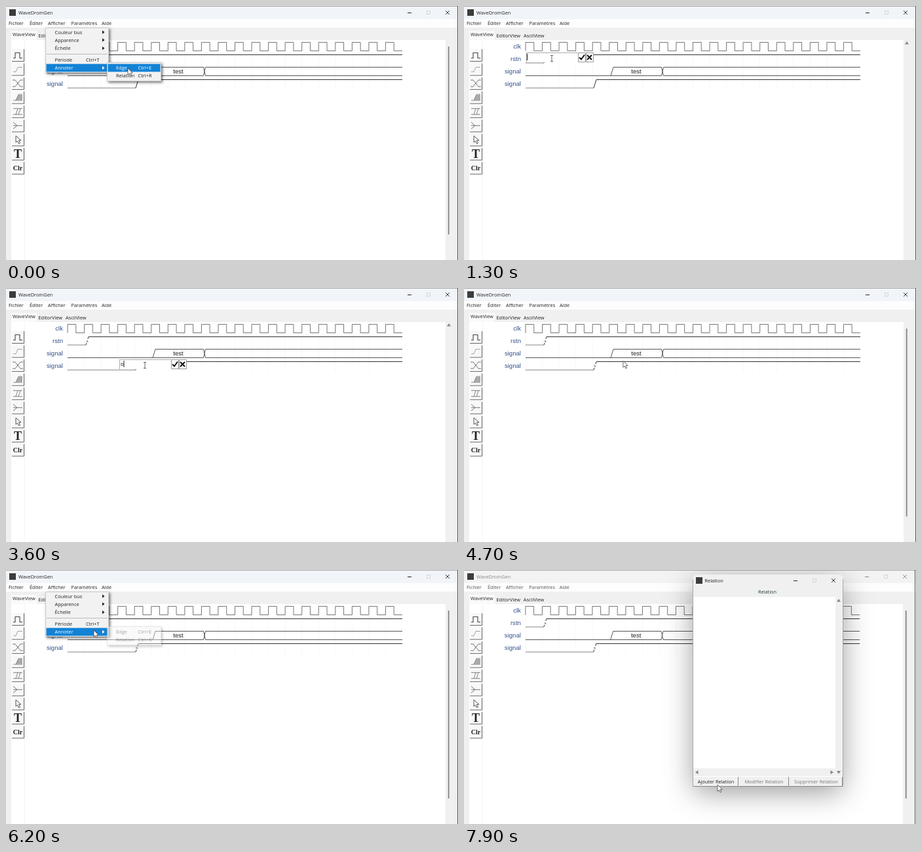
An HTML page with a canvas for the animation above (8 s loop, 690 px wide and 388 px high).

```html
<!DOCTYPE html>
<html lang="fr">
<head>
<meta charset="utf-8">
<style>
html, body { margin: 0; width: 100%; height: 100%; overflow: hidden; }
canvas { display: block; }
</style>
</head>
<body>
<canvas id="stage" width="690" height="388"></canvas>
<script>
const ctx = document.getElementById('stage').getContext('2d');
const UI = '7.4px "Open Sans", sans-serif';
const LABEL = '9.6px "Liberation Sans", Arial, sans-serif';
const INK = '#333', BLUE = '#1282d6';

function rect(x, y, w, h, color) {
  ctx.fillStyle = color;
  ctx.fillRect(x, y, w, h);
}

function text(str, x, y, color = '#222', font = UI, align = 'left') {
  ctx.font = font;
  ctx.textAlign = align;
  ctx.fillStyle = color;
  ctx.fillText(str, x, y);
}

function stroke(d, color = INK, width = 1) {
  ctx.strokeStyle = color;
  ctx.lineWidth = width;
  ctx.stroke(new Path2D(d));
}

function fill(d, color) {
  ctx.fillStyle = color;
  ctx.fill(new Path2D(d));
}

// Shadow of a box, painted only outside the box so that it can fade cleanly.
function boxShadow(x, y, w, h, blur, dx, dy, alpha) {
  ctx.save();
  const outside = new Path2D();
  outside.rect(-100, -100, 900, 600);
  outside.rect(x, y, w, h);
  ctx.clip(outside, 'evenodd');
  ctx.shadowColor = `rgba(0,0,0,${alpha})`;
  ctx.shadowBlur = blur;
  ctx.shadowOffsetX = dx;
  ctx.shadowOffsetY = dy;
  rect(x, y, w, h, '#000');
  ctx.restore();
}

function at(x, y, draw) {
  ctx.save();
  ctx.translate(x, y);
  draw();
  ctx.restore();
}

function windowControls(x, y, color) {
  stroke(`M${x - 3} ${y + .5}h6`, color);
  stroke(`M${x + 26.5} ${y - 2.5}h5v5h-5z`, '#ccc', .8);
  stroke(`M${x + 55} ${y - 3}l6 6m0-6l-6 6`, color, .9);
}

const tools = [
  () => stroke('M-7 4.500h3v-8h7v8h4', '#444', 1.1),
  () => stroke('M-7 4h4l3-7h7', '#999', .9),
  () => { stroke('M-8-5h4l8 10h4', '#666', .9); stroke('M-8 5h4l8-10h4', '#666', .9); },
  () => { fill('M-3 4l4-8h6v8z', '#aaa'); stroke('M-7 4.500h4l4-9h6M-3 4.500h10', '#777', .8); },
  () => { stroke('M-7-4.500h14M-7 4.500h14', '#777', .9); stroke('M-3 4.500l3-9M1 4.500l3-9', '#777', .9); },
  () => stroke('M-7-5l6 5h8M-7 5l6-5M-7 0h5', '#666', .9),
  () => stroke('M-3-6v10l2.500-2 2 4 2-1-2-4h3.500z', '#444', .9),
  () => text('T', 0, 6, '#222', 'bold 18px "Liberation Serif", serif', 'center'),
  () => text('Clr', 0, 4, '#222', 'bold 10px "Liberation Serif", serif', 'center')
];

function drawFrame(active) {
  const ink = active ? '#222' : '#888', menuInk = active ? '#222' : '#555';
  rect(0, 0, 692, 388, '#f0f0f0');
  rect(0, 0, 692, 20, active ? '#f1f4f8' : '#f3f3f3');
  rect(0, 20, 692, 13, '#fdfdfd');
  rect(8, 38, 39, 14, '#fafafa');
  rect(8, 52, 663, 336, '#fff');
  rect(28, 52, 1, 336, '#f3f3f3');
  rect(0, 0, 692, 1, '#aaa');
  rect(689, 0, 1, 388, '#555');
  rect(5, 5, 10, 10, '#3c3c3c');
  text('WaveDromGen', 19, 13, ink);
  windowControls(616, 10, ink);
  [['Fichier', 4], ['Éditer', 36], ['Afficher', 64], ['Paramètres', 99.5], ['Aide', 146]]
    .forEach(([name, x]) => text(name, x, 29, menuInk));
  text('WaveView', 10, 46);
  text('EditorView', 49.5, 47.5);
  text('AsciiView', 91, 47.5);
  tools.forEach((draw, i) => at(18, 75 + 21.55 * i, () => {
    rect(-9, -9, 18, 18, '#f8f8f8');
    stroke('M-9 9.500H9.500V-9', '#666');
    draw();
  }));
}

function drawWaves(marks) {
  ['clk', 'rstn', 'signal', 'signal'].forEach((name, i) =>
    text(name, 87, 64.5 + 19.2 * i, '#34508a', LABEL, 'right'));

  let clk = 'M94 68.5';
  for (let i = 0; i < 20; i++) {
    const x = 94 + 25.55 * i;
    stroke(`M${x} 52V128`, '#f8f8f8');
    clk += `H${x}V55.5H${x + 12.75}V68.5`;
  }
  stroke(clk + 'H605', '#555', .8);
  stroke('M94 87H122', '#666', .8);
  stroke('M122 87L126 74.500H605');
  stroke('M94 106.500H301.500L304.500 93.500H605M224 106.500L228 93.500H301.500L304.500 106.500H605', '#555');
  stroke('M94 125.200H198', '#666', .8);
  stroke('M198 125.200L202 112.500H605');
  text('test', 263, 103, '#222', LABEL, 'center');
  marks.forEach(([name, x, y]) => {
    rect(x - 2, y - 3, 4, 6, '#fff');
    text(name, x, y + 2, '#555', '6px "Liberation Sans", sans-serif', 'center');
  });
}

function drawScrollbar(editing) {
  if (editing) fill('M673 58.500l3-4.500 3 4.500z', '#888');
  else rect(674.8, 62, 1.8, 287, '#858585');
}

function drawField(x, y, value) {
  at(x, y, () => {
    rect(0, 0, 103, 15, '#fff');
    stroke('M0 .5H79M.5 0V15', '#aaa');
    text(value, 2, 9.5, '#222', '8px "Open Sans", sans-serif');
    rect(value ? 6.5 : 1, 2, 1, 10, '#222');
    for (const bx of [79, 91]) stroke(`M${bx + .5} .5h11v14h-11z`, '#999');
    stroke('M81 7.500l3 3 5-7', '#111', 2);
    stroke('M93 4l7 7m0-7l-7 7', '#111', 2);
  });
}

const menuItems = [['Couleur bus', 40], ['Apparence', 52], ['Échelle', 64.5], ['Période', 82, 'Ctrl+T'], ['Annoter', 94.5]];
const subItems = [['Edge', 94.5, 'Ctrl+E'], ['Relation', 106.5, 'Ctrl+R']];

function drawMenu(x, y, w, h, items, textX, keyX, hovered, alpha) {
  ctx.save();
  ctx.globalAlpha = alpha;
  boxShadow(x, y, w, h, 4, 2, 2, .55);
  rect(x, y, w, h, '#f2f2f2');
  stroke(`M${x + .5} ${y + .5}h${w - 1}v${h - 1}h${1 - w}z`, '#ccc');
  for (const [name, cy, key] of items) {
    const on = name === hovered;
    if (on) rect(x + 1.5, cy - 6, w - 3, 12, BLUE);
    const color = on ? '#fff' : '#222';
    text(name, textX, cy + 2.7, color);
    if (key) text(key, keyX, cy + 2.7, color);
    else fill(`M147 ${cy - 2.7}l3.500 2.700-3.500 2.700z`, on ? '#fff' : '#222');
  }
  if (items === menuItems) rect(x + 2, 73, w - 4, 1, '#bbb');
  ctx.restore();
}

function drawDialog(progress) {
  ctx.save();
  ctx.globalAlpha = progress;
  const scale = .92 + .08 * progress;
  ctx.translate(464, 169);
  ctx.scale(scale, scale);
  ctx.translate(-464, -169);
  boxShadow(352, 10, 224, 318, 42, 0, 10, .42);
  ctx.fillStyle = '#f0f0f0';
  ctx.beginPath();
  ctx.roundRect(349, 7, 230, 324, [6, 6, 2, 2]);
  ctx.fill();
  stroke('M349.500 14V330.500H578.500V14', '#999', .8);
  rect(354, 11, 10, 10, '#3c3c3c');
  text('Relation', 367.5, 19);
  windowControls(506, 16, '#222');
  text('Relation', 463, 36, '#23402f', UI, 'center');
  rect(350, 41, 217, 262, '#fff');
  fill('M569 48.500l3-4.500 3 4.500zM569 307l3 4.500 3-4.500zM357.500 306l-4.500 3 4.500 3zM559.500 306l4.500 3-4.500 3z', '#858585');
  [['Ajouter Relation', 350, 69], ['Modifier Relation', 420, 76], ['Supprimer Relation', 497, 81]].forEach(([name, x, w], i) => {
    stroke(`M${x} 330.500H${x + w - .5}V316`, '#888');
    stroke(`M${x} 315.500h${w}`, '#fff');
    text(name, x + w / 2, 326, i ? '#777' : '#222', UI, 'center');
  });
  ctx.restore();
}

// Pointer path: time, x, y
const path = [
  [0, 186, 95], [200, 186, 95], [800, 124, 81], [1000, 125, 80], [1300, 134, 80],
  [1900, 134, 80], [2400, 181, 81], [2700, 181, 81], [3100, 200, 118], [3300, 200, 118],
  [3500, 212, 118], [3700, 212, 118], [4300, 256, 118], [4600, 256, 118], [5200, 79, 27],
  [5400, 79, 27], [6000, 128, 93], [6200, 134, 92], [6600, 185, 104], [6900, 185, 104],
  [7600, 387, 301], [7800, 387, 328], [8000, 387, 328]
];

function pointerAt(t) {
  const i = path.findIndex(p => p[0] > t);
  const [t0, x0, y0] = path[i - 1], [t1, x1, y1] = path[i];
  const u = (t - t0) / (t1 - t0), e = u * u * (3 - 2 * u);
  return [x0 + (x1 - x0) * e, y0 + (y1 - y0) * e];
}

function drawPointer(x, y, beam) {
  at(x, y, () => {
    if (beam) return stroke('M-2-4.500h4M-2 4.500h4M0-4.500v9', '#555', .9);
    const arrow = 'M0 0V10L2.300 8 4 11.700 5.700 11 4.100 7.300H7.200Z';
    fill(arrow, '#fff');
    stroke(arrow, '#444', .8);
  });
}

function draw(t) {
  const within = (a, b) => t >= a && t < b;
  const [x, y] = pointerAt(t);
  const firstField = within(1000, 2700), secondField = within(3300, 4600);
  const dialogOpen = t >= 7000;
  const marks = [];
  if (t >= 2700) marks.push(['a', 124, 81]);
  if (t >= 4600) marks.push(['b', 200, 119]);

  // The main window sits a pixel narrower behind the dialog.
  ctx.save();
  if (dialogOpen) ctx.scale(689 / 690, 1);
  drawFrame(!dialogOpen);
  drawWaves(marks);
  drawScrollbar(firstField || secondField);
  ctx.restore();

  if (firstField) drawField(95, 71, t >= 1900 ? 'a' : '');
  if (secondField) drawField(173, 109, t >= 3600 ? 'b' : '');

  const early = t < 200;
  if (early || within(5400, 6900)) {
    const subAlpha = early || t >= 6300 ? 1 : t >= 6200 ? .4 : 0;
    const inSub = subAlpha && x > 154;
    const under = items => (items.find(([, cy]) => Math.abs(cy - y) <= 6.2) || [])[0];
    drawMenu(60, 33, 97, 69, menuItems, 74.5, 122, inSub ? 'Annoter' : under(menuItems), t === 5400 ? .6 : 1);
    if (subAlpha) drawMenu(154, 86, 83, 29, subItems, 168, 201.5, inSub ? under(subItems) : '', subAlpha);
  }
  if (dialogOpen) drawDialog(Math.min(1, (t - 6900) / 200));
  drawPointer(x, y, (firstField && x < 172) || (secondField && x < 250));
}

function tick() {
  draw(Math.floor(performance.now() % 8000 / 100) * 100);
  requestAnimationFrame(tick);
}
tick();
</script>
</body>
</html>
```
